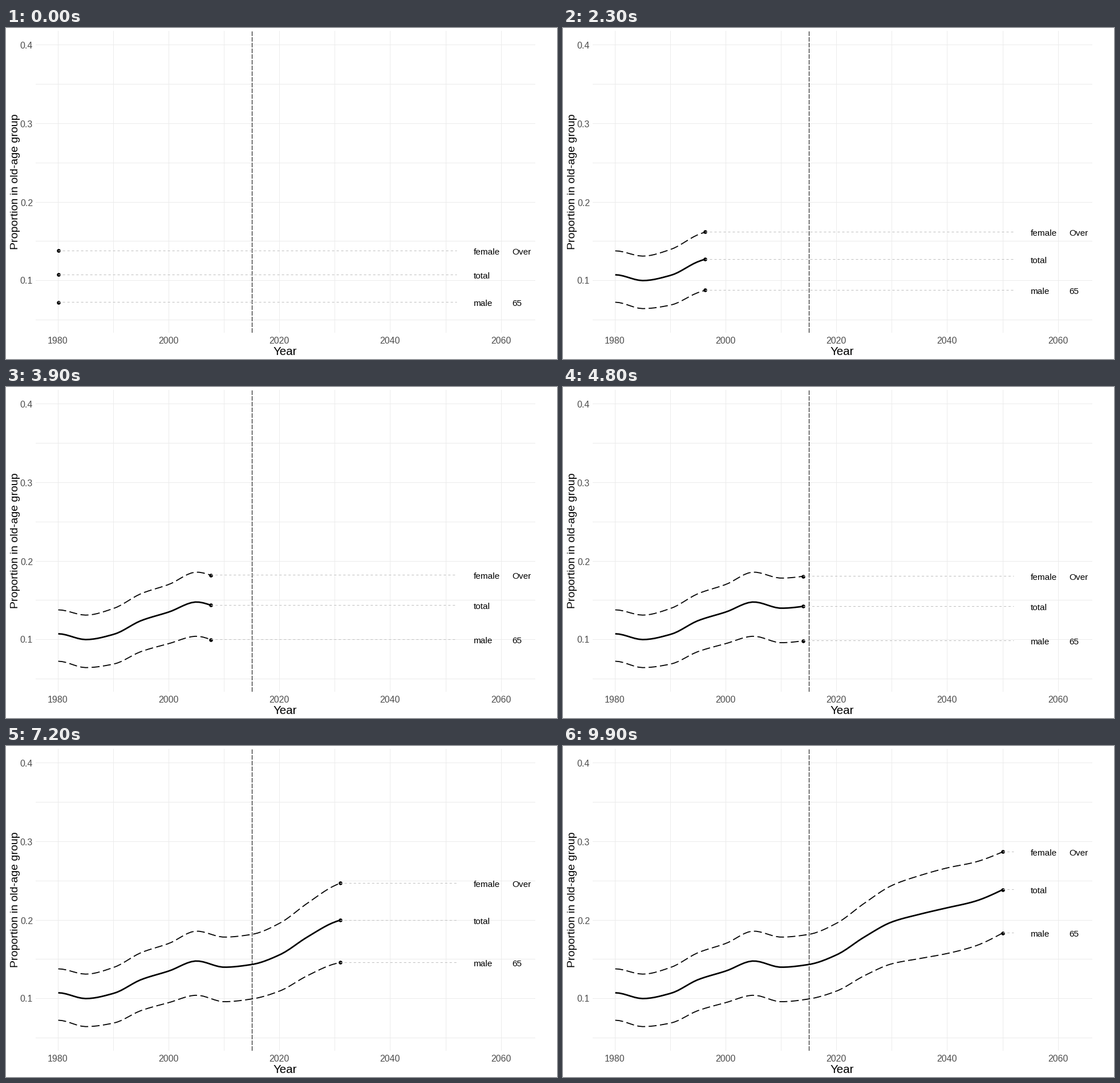
These frames come from a looping animation (966 px wide and 580 px high, 10000 ms). A matplotlib script:

```python
import numpy as np
import matplotlib.pyplot as plt
from matplotlib.animation import FuncAnimation

W, H, DPI = 966, 580, 100
PX = 72 / DPI  # points per pixel
FRAMES, INTERVAL = 100, 100
LEFT, RIGHT, TOP, BOTTOM = 52, 928, 5, 534
START, END, STEP = 1980, 2050, 5
GRID, TICK, LEAD = "#ebebeb", "#4d4d4d", "#bebebe"

plt.rcParams["font.family"] = ["Liberation Sans", "DejaVu Sans"]
plt.rcParams["lines.scale_dashes"] = False

# Percentages every five years
FEMALE = [13.8, 13.13, 13.98, 15.87, 17.04, 18.6, 17.84, 18.19, 19.61, 22.15,
          24.42, 25.67, 26.65, 27.38, 28.69]
MALE = [7.26, 6.45, 6.9, 8.5, 9.51, 10.44, 9.62, 9.97, 10.98, 12.93,
        14.45, 15.11, 15.76, 16.7, 18.37]
MALE_SHARE = 0.466


def year_x(year):
    return 91.6 + (year - START) * 9.706


def value_y(value):
    return 29.7 + (0.4 - value) * 1377


def centre(v):
    return np.floor(v) + 0.5


def smooth(years, values):
    """Monotone cubic through five-yearly values, level at the start."""
    v = np.array(values)
    d = np.diff(v)
    a, b = d[:-1], d[1:]
    turn = a * b <= 0
    inner = np.where(turn, 0, 2 * a * b / np.where(turn, 1, a + b))
    slope = np.concatenate([[0], inner, [1.5 * d[-1] - 0.5 * inner[-1]]])
    pos = (years - START) / STEP
    k = np.minimum(pos.astype(int), len(d) - 1)
    t = pos - k
    return (v[k] + d[k] * t * t * (3 - 2 * t)
            + slope[k] * t * (1 - t) ** 2 - slope[k + 1] * t * t * (1 - t))


fig = plt.figure(figsize=(W / DPI, H / DPI), dpi=DPI, facecolor="white")
ax = fig.add_axes([0, 0, 1, 1])
ax.set_xlim(0, W)
ax.set_ylim(H, 0)
ax.axis("off")


def dashed(on, off):
    return (0, (on * PX, off * PX))


def line(xs, ys, color, width=1, dash="-", z=1):
    art, = ax.plot(xs, ys, color=color, lw=width * PX, ls=dash, zorder=z,
                   snap=False, solid_capstyle="butt", dash_capstyle="butt")
    return art


def label(x, y, text, size, color="black", **kw):
    return ax.text(x, y, text, fontsize=size * PX, color=color,
                   va="baseline", zorder=6, **kw)


for i in range(1, 9):
    value = i * 0.05
    y = centre(value_y(value))
    line([LEFT, RIGHT], [y, y], GRID)
    if i % 2 == 0:
        label(47, round(y + 6), f"{value:.1f}", 16, TICK, ha="right")

for year in range(1980, 2070, 10):
    x = centre(year_x(year))
    line([x, x], [TOP, BOTTOM], GRID)
    if year % 20 == 0:
        label(x - 0.5, 553, str(year), 16, TICK, ha="center")

label(489, 573, "Year", 20.5, ha="center")
label(21, 269.5, "Proportion in old-age group", 19.5, ha="center",
      rotation=90, rotation_mode="anchor")

now_x = centre(year_x(2015))
line([now_x, now_x], [BOTTOM, TOP], "black", dash=dashed(8, 2), z=2)

years = np.linspace(START, END, FRAMES)
xs = year_x(years)


class Series:
    def __init__(self, percent, name, group, width, dash):
        self.ys = value_y(percent / 100)
        self.curve = line([], [], "black", width, dash, 3)
        self.dot, = ax.plot([], [], "o", color="black", ms=6.6 * PX, mew=0, zorder=4)
        self.lead = line([], [], LEAD, 1, dashed(4, 4), 5)
        self.texts = [label(year_x(2055), 0, name, 15.4),
                      label(year_x(2062), 0, group, 15.4)]

    def show(self, i):
        x, y = xs[i], self.ys[i]
        self.curve.set_data(xs[:i + 1], self.ys[:i + 1])
        self.dot.set_data([x], [y])
        self.lead.set_data([x, year_x(2052)], [centre(y)] * 2)
        for text in self.texts:
            text.set_y(round(y + 6.5))
        return [self.curve, self.dot, self.lead, *self.texts]


female, male = smooth(years, FEMALE), smooth(years, MALE)
total = female + MALE_SHARE * (male - female)
long_dash = dashed(14, 6)
series = [Series(female, "female", "Over", 1.8, long_dash),
          Series(total, "total", "", 2.7, "-"),
          Series(male, "male", "65", 1.8, long_dash)]


def update(i):
    return [art for s in series for art in s.show(i)]


anim = FuncAnimation(fig, update, frames=FRAMES, interval=INTERVAL,
                     repeat=True, repeat_delay=0, blit=False)
plt.show()
```
